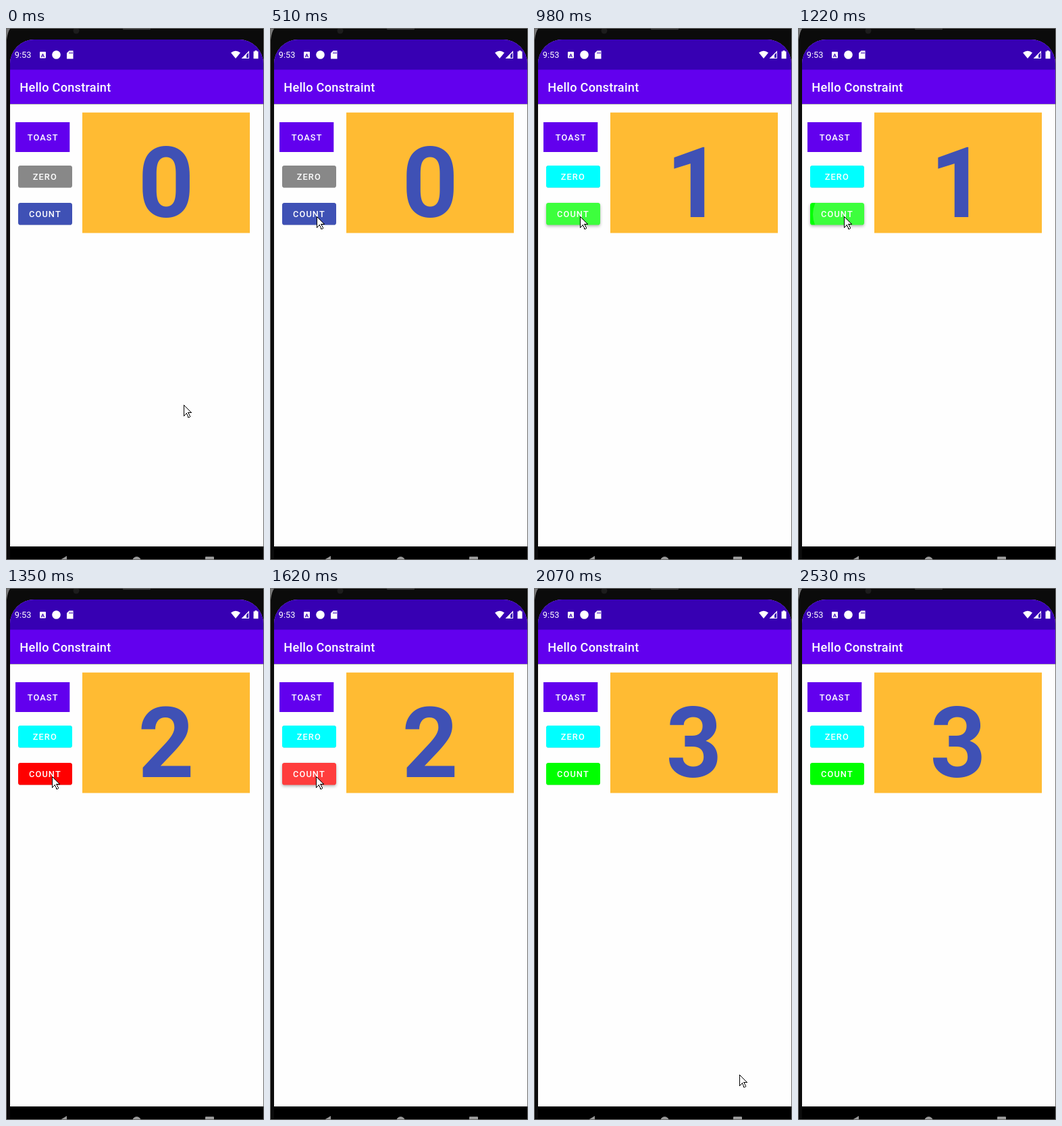
An HTML page for the animation above (3.21 s loop, 382x785 px).

```html
<!DOCTYPE html>
<html lang="en">
<head>
<meta charset="utf-8">
<title>Counter app</title>
<style>
  html, body { margin: 0; width: 100%; height: 100%; overflow: hidden; background: #0b0b0b; }
  svg { display: block; width: 382px; height: 785px; font-family: Roboto, sans-serif; fill: #fff; }
  .label { font-size: 12.75px; font-weight: 500; letter-spacing: .0893em; }
  .title { font-size: 18.2px; font-weight: 500; letter-spacing: .0125em; }
  .digit { font-size: 145px; font-weight: 700; text-anchor: middle; fill: #3f51b5; }
  .rest { filter: drop-shadow(0 .6px .6px rgba(0,0,0,.3)); }
  .raised { filter: drop-shadow(0 2px 2px rgba(0,0,0,.3)); }
</style>
</head>
<body>
<svg viewBox="0 0 382 785">
  <defs>
    <clipPath id="screen"><rect x="6" y="17" width="375" height="900" rx="36"/></clipPath>
    <clipPath id="face"><use href="#button" y="258"/></clipPath>
    <rect id="button" x="18" width="80" height="32.5" rx="3.6"/>
  </defs>

  <!-- phone body -->
  <rect width="382" height="785" fill="#0b0b0b"/>
  <path d="M0 0H7Q1 6 0 30Z" fill="#777"/>
  <circle cx="104" cy="4" r="4.5" fill="#1c1c1c"/>
  <rect x="173" width="41" height="2.5" rx="1" fill="#3a3a3a"/>

  <g clip-path="url(#screen)">
    <rect width="382" height="785" fill="#fefefe"/>
    <rect width="382" height="112" fill="#6200ee"/>
    <rect width="382" height="61.5" fill="#3700b3"/>
    <rect y="112" width="382" height="1" opacity=".3" fill="#000"/>
    <rect y="765" width="382" height="20" fill="#000"/>
    <g fill="#999">
      <path d="M90 779V785H80Z"/>
      <circle cx="193.5" cy="786.5" r="6.5"/>
      <rect x="295" y="780" width="13" height="9" rx="1"/>
    </g>
  </g>
  <rect x=".5" y=".5" width="381" height="784" stroke="#6d6d6d" fill="none"/>

  <!-- status bar -->
  <text x="12.8" y="44.3" font-size="12.75">9:53</text>
  <rect x="50" y="35" width="9" height="9.5" rx="1"/>
  <text x="54.5" y="42.500" font-size="8" font-weight="700" text-anchor="middle" fill="#3700b3">A</text>
  <circle cx="74.500" cy="39.500" r="6.300"/>
  <path d="M93.500 33.500H99.500V45.500H90V37Z"/>
  <path d="M94 35.500V38M96 35.500V38M98 35.500V38" stroke="#3700b3"/>
  <path d="M333 36.500Q340 31 347 36.500L340 45Z"/>
  <path d="M348.500 45L360 33.500V45Z"/>
  <path d="M356 39.500L359 36.500V44H356Z" fill="#3700b3"/>
  <path d="M366.500 34.500H368.500V33.300H371.500V34.500H373.500V45.200H366.500Z"/>

  <text class="title" x="20.3" y="94">Hello Constraint</text>

  <!-- content -->
  <rect x="113" y="124.700" width="248" height="177.800" fill="#ffbb33"/>
  <text id="count" class="digit" x="237.200" y="279"></text>

  <rect x="14" y="139" width="80.300" height="44" fill="#6200ee"/>
  <text class="label" x="31.700" y="166">TOAST</text>

  <use id="zero" class="rest" href="#button" y="203"/>
  <text class="label" x="39.700" y="224">ZERO</text>

  <use id="add" href="#button" y="258"/>
  <circle id="ripple" cx="64" cy="275" opacity=".24" clip-path="url(#face)"/>
  <text class="label" x="34" y="278.800">COUNT</text>

  <path id="cursor" d="M.5 .5V16.500L4.500 12.500L7 18.500H8.500L9.500 17L7 11.500H11.500Z"
    stroke="#000" shape-rendering="crispEdges"/>
</svg>
<script>
const LOOP = 3210;
const CLICKS = [980, 1350, 1770];
// down, up, first ripple radius
const PRESSES = [[980, 1100, 60], [1220, 1350, 42], [1470, 1770, 42]];
const LEAVE = 1770, HIDE = 2530;

const [count, zero, add, ripple, cursor] =
  ['count', 'zero', 'add', 'ripple', 'cursor'].map(id => document.getElementById(id));

// The pointer slows down onto the button, then darts away, in coarse steps.
function pointer(t) {
  if (t < LEAVE) {
    const left = 1 - Math.min(1, Math.floor(t / 125) / 5);
    return [68 + 195 * left ** 3.3, 278 + 278 * left ** 5.3];
  }
  const left = .037 ** Math.floor((t - LEAVE) / 150);
  return [304 - 236 * left, 719 - 441 * left];
}

function rippleRadius(t) {
  const press = PRESSES.find(([down, up]) => t >= down && t < up);
  if (!press) return 0;
  const [down, , radius] = press;
  return radius + 18 * Math.floor((t - down) / 150);
}

function draw(t) {
  const n = CLICKS.filter(click => click <= t).length;
  const r = rippleRadius(t);
  const [x, y] = pointer(t).map(Math.round);

  count.textContent = n;
  zero.setAttribute('fill', n ? '#00ffff' : '#888888');
  add.setAttribute('fill', n === 0 ? '#3f51b5' : n % 2 ? '#00ff00' : '#ff0000');
  add.setAttribute('class', r ? 'raised' : 'rest');
  ripple.setAttribute('r', r);
  cursor.setAttribute('transform', `translate(${x} ${y})`);
  cursor.setAttribute('visibility', t < HIDE ? 'visible' : 'hidden');
}

const start = performance.now();
function tick() {
  draw((performance.now() - start) % LOOP);
  requestAnimationFrame(tick);
}
tick();
</script>
</body>
</html>
```
